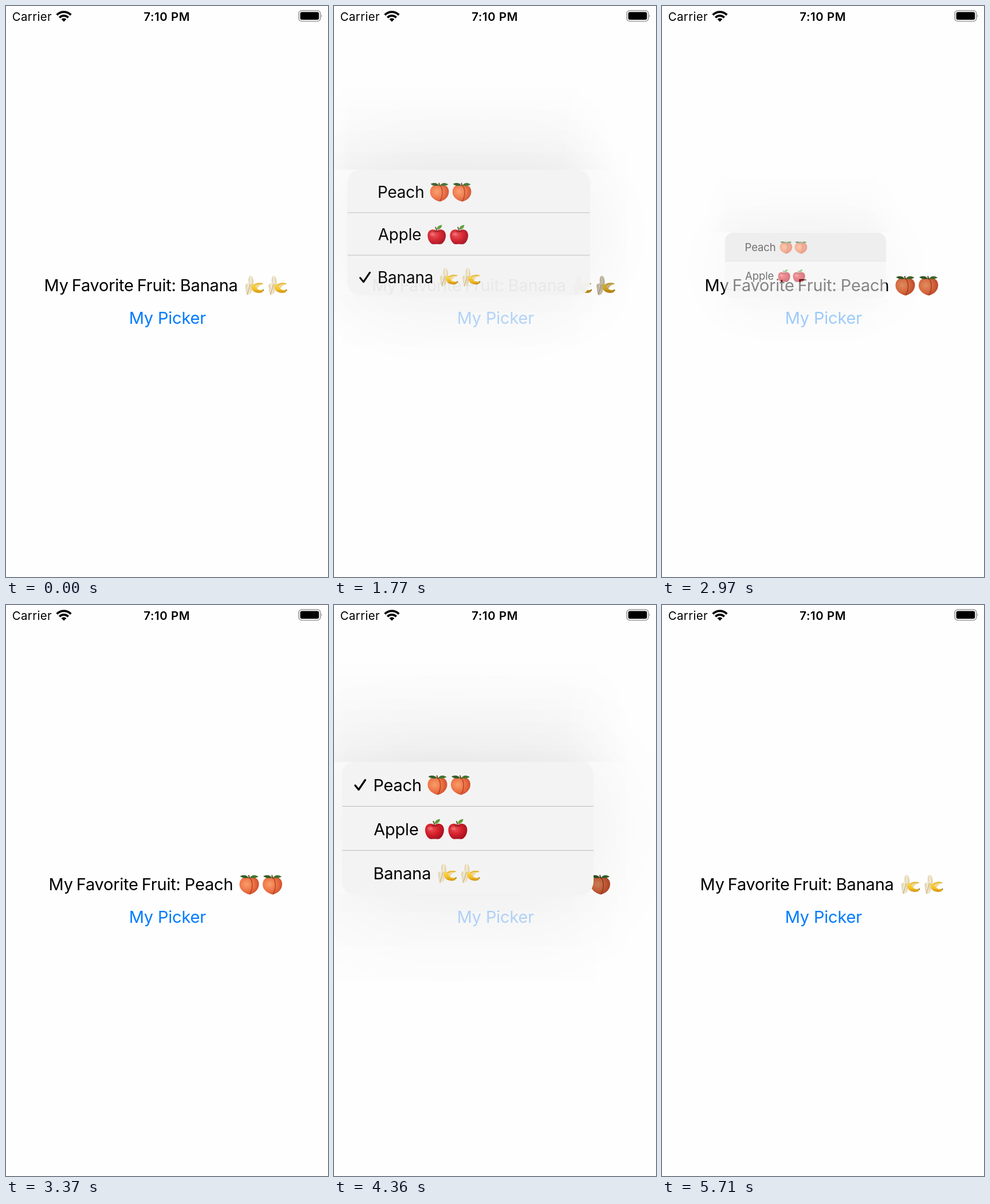
An HTML page for the animation above (5.74 s loop, 562 by 997 pixels).

```html
<!DOCTYPE html>
<html lang="en">
<head>
<meta charset="utf-8">
<title>Fruit picker</title>
<style>
  html, body { margin: 0; width: 100%; height: 100%; overflow: hidden; background: #fefefe; }
  svg { position: absolute; left: 0; top: 0; overflow: visible; }
  text { font: 29px Inter, Roboto, sans-serif; letter-spacing: -.2px; }
  .status { font-size: 20.4px; letter-spacing: .35px; }
  .clock { font-weight: 600; letter-spacing: .6px; text-anchor: middle; }
  #button { fill: #007aff; }

  #menu {
    position: absolute; left: 14px; top: 274px; width: 439px; height: 232px;
    border-radius: 23px; background: #f3f3f3;
    box-shadow: 0 0 185px rgba(0, 0, 0, .085);
    transform-origin: 266.5px 339px;
  }
  #menu::before, #menu::after {
    --sides: linear-gradient(to right, transparent, #000 12%, #000 80%, transparent);
    content: ""; position: absolute; left: -60px; width: 560px; height: 180px;
    -webkit-mask-image: var(--sides); mask-image: var(--sides);
  }
  #menu::before { bottom: 100%; background: linear-gradient(to top, rgba(0, 0, 0, .034), transparent); }
  #menu::after { top: 100%; background: linear-gradient(to bottom, rgba(0, 0, 0, .012), transparent); }
  #rows { position: absolute; inset: 0; overflow: hidden; border-radius: 23px; }
</style>
</head>
<body>
<svg width="562" height="997" viewBox="0 0 562 997">
  <defs>
    <radialGradient id="peachSkin" cx=".36" cy=".42" r=".68">
      <stop offset="0" stop-color="#f99d6b"/>
      <stop offset=".55" stop-color="#ee7345"/>
      <stop offset="1" stop-color="#cd4b2b"/>
    </radialGradient>
    <radialGradient id="appleSkin" cx=".36" cy=".36" r=".7">
      <stop offset="0" stop-color="#ee4f55"/>
      <stop offset=".5" stop-color="#d4212c"/>
      <stop offset="1" stop-color="#a30f1d"/>
    </radialGradient>
    <linearGradient id="bananaSkin" x2="0" y2="1">
      <stop offset="0" stop-color="#fbd645"/>
      <stop offset=".55" stop-color="#f5c026"/>
      <stop offset="1" stop-color="#cf9212"/>
    </linearGradient>
    <linearGradient id="flesh">
      <stop offset="0" stop-color="#dccdaa"/>
      <stop offset=".45" stop-color="#f5ecd6"/>
      <stop offset="1" stop-color="#dccba0"/>
    </linearGradient>

    <symbol id="peach" viewBox="0 0 36 36">
      <path d="M18 6C10 2 1 8 1 18C1 27 9 33 18.500 35.500C28 33 35 27 35 17C35 8 26 2 18 6Z" fill="url(#peachSkin)"/>
      <path d="M19 6C25 13 24 26 19 35" fill="none" stroke="#ac4122" stroke-width="1.4"/>
      <path d="M17 6C12 8 6 7 2 3.500C7 .5 14 1 17 6Z" fill="#355f2a"/>
      <path d="M19 6C23 .5 29 .5 34 4.500C29 7 24 8 19 6Z" fill="#44732f"/>
      <path d="M17 1.500L18.500 7.500" stroke="#6b4426" stroke-width="2"/>
    </symbol>
    <symbol id="apple" viewBox="0 0 36 36">
      <path d="M18 11C11 6 2 9 1.5 19C1.5 28 7 36 13 35.5C16 35 20 35 23 35.5C29 36 34.5 28 34.5 19C34 9 25 6 18 11Z" fill="url(#appleSkin)"/>
      <path d="M11 11Q18 16 25 11Q18 12.500 11 11Z" fill="#8c101a"/>
      <path d="M18 13Q18 8 15.500 4" fill="none" stroke="#67452b" stroke-width="1.8"/>
      <path d="M18 9C18 4 22 1 27.500 .5C27.500 6 23 9 18 9Z" fill="#5a9f36"/>
      <ellipse cx="10" cy="17" rx="4" ry="3" fill="#fff" opacity=".18"/>
    </symbol>
    <symbol id="banana" viewBox="0 0 36 36">
      <path d="M8 16C6.500 8 7 2 10.500 1C15 1 16.500 8 16 17Z" fill="url(#flesh)"/>
      <path d="M9 14C3 14 1 16 2 21C3 26 2.500 31 5 35C10 35 12 31 13 26Q14 21 14 16Z" fill="url(#flesh)"/>
      <path d="M10 16Q8 25 5 34" fill="none" stroke="#bda877" stroke-width="1.1"/>
      <path d="M14 18C18 13 27 12 33 15Q24 18 22 25Z" fill="#efd795"/>
      <path d="M17 18Q23 13 32.500 15" fill="none" stroke="#e5b82c" stroke-width="2"/>
      <path d="M12 17C15 15 19 18 20 21C23 26 28 27 33 25C34.500 28 31 31 26 31C17 31 11 26 12 17Z" fill="url(#bananaSkin)"/>
      <circle cx="33" cy="26" r="1" fill="#675126"/>
    </symbol>
  </defs>

  <text class="status" x="10.800" y="25.500">Carrier</text>
  <text class="status clock" x="280.800" y="25.500">7:10 PM</text>
  <g fill="none" stroke="#000" stroke-width="3.700">
    <path d="M88.700 15.600A17.300 17.300 0 0 1 113.300 15.600"/>
    <path d="M93.300 20.200A10.800 10.800 0 0 1 108.700 20.200"/>
    <path d="M101 27.500L96.600 23.100A6.200 6.200 0 0 1 105.400 23.100Z" fill="#000" stroke="none"/>
  </g>
  <rect x="511" y="8" width="37.700" height="18.500" rx="5" fill="none" stroke="#999" stroke-width="1.600"/>
  <rect x="513.500" y="10.500" width="32.700" height="13.500" rx="3" fill="#000"/>
  <path d="M550.300 14.200Q552.600 17.200 550.300 20.300Z" fill="#999"/>

  <g id="title">
    <text y="498"><tspan x="66.500">My</tspan> <tspan x="114.700">Favorite</tspan> <tspan x="228.700">Fruit:</tspan> <tspan id="pick" x="303.800">Banana</tspan></text>
    <g id="pair"></g>
  </g>
  <text id="button" x="214.700" y="555">My Picker</text>
</svg>

<div id="menu">
  <div id="rows">
    <svg width="439" height="232" viewBox="14 274 439 232">
      <rect id="press" x="14" width="439" height="77.250" fill="#000" opacity=".07"/>
      <path d="M14 351.500H453M14 428.500H453" stroke="#bcbcbc"/>
      <path id="check" d="M37 315L43 322.500L54.500 305.500" fill="none" stroke="#000" stroke-width="3.300" stroke-linecap="round" stroke-linejoin="round"/>
      <g id="items"></g>
    </svg>
  </div>
</div>

<script>
const LOOP = 5740, STEP = 50, ROW = 77.25, DIM = 0.72, SHADE = 0.18;
const fruits = [
  { name: 'Peach', textX: 68.4, iconX: 162.5, titleX: 398.5, shift: 8 },
  { name: 'Apple', textX: 69.2, iconX: 157.5 },
  { name: 'Banana', textX: 68.4, iconX: 180, titleX: 416, shift: 0 }
];
const PEACH = 0, BANANA = 2;
const rounds = [
  { open: 1360, press: 2740, close: 2920, before: BANANA, after: PEACH },
  { open: 3760, press: 5170, close: 5220, before: PEACH, after: BANANA }
];

const el = id => document.getElementById(id);
const icons = (fruit, x, y) => [x, x + 40.5].map(left =>
  `<use href="#${fruit.name.toLowerCase()}" x="${left}" y="${y}" width="36" height="36"/>`).join('');

el('items').innerHTML = fruits.map((f, i) =>
  `<text x="${f.textX}" y="${324.5 + i * ROW}">${f.name}</text>` + icons(f, f.iconX, 296 + i * ROW)).join('');

// Critically damped spring: share of the way left after ms
const rest = ms => {
  const x = Math.max(0, ms) * 0.016;
  return (1 + x) * Math.exp(-x);
};
const elapsed = (t, start) => Math.floor((t - start) / STEP) * STEP;

function stateAt(t) {
  const r = t < rounds[1].open ? rounds[0] : rounds[1];
  const state = { show: 0, dim: 0, press: -1, check: r.before, pick: r.before };
  if (t < r.open) return state;
  if (t < r.close) {
    const ms = elapsed(t, r.open);
    state.show = 1 - rest(ms - 95);
    state.dim = Math.min(1, ms / 280);
  } else {
    const ms = elapsed(t, r.close);
    state.show = rest(ms + 45);
    state.dim = Math.max(0, 1 - ms / 400);
    state.pick = r.after;
  }
  if (t >= r.press) state.press = r.after;
  if (state.show > 0.98) state.show = 1;
  if (state.show < 0.008) state.show = 0;
  return state;
}

let shown = -1;
function setTitle(index) {
  if (index === shown) return;
  shown = index;
  const f = fruits[index];
  el('pick').textContent = f.name;
  el('pair').innerHTML = icons(f, f.titleX, 470);
  el('title').setAttribute('transform', `translate(${f.shift})`);
}

function draw(t) {
  const s = stateAt(t);
  setTitle(s.pick);
  el('pair').style.filter = s.show ? `brightness(${1 - SHADE * s.show})` : 'none';
  el('button').style.opacity = 1 - DIM * s.dim;
  const menu = el('menu').style;
  menu.visibility = s.show ? 'visible' : 'hidden';
  menu.opacity = s.show;
  menu.height = 232 * (0.5 + 0.5 * s.show) + 'px';
  menu.transform = `scale(${0.2 + 0.8 * s.show})`;
  el('check').setAttribute('transform', `translate(0 ${s.check * ROW})`);
  el('press').setAttribute('y', 274 + s.press * ROW);
  el('press').style.display = s.press < 0 ? 'none' : '';
}

const begin = performance.now();
function tick() {
  draw((performance.now() - begin) % LOOP);
  requestAnimationFrame(tick);
}
tick();
</script>
</body>
</html>
```
